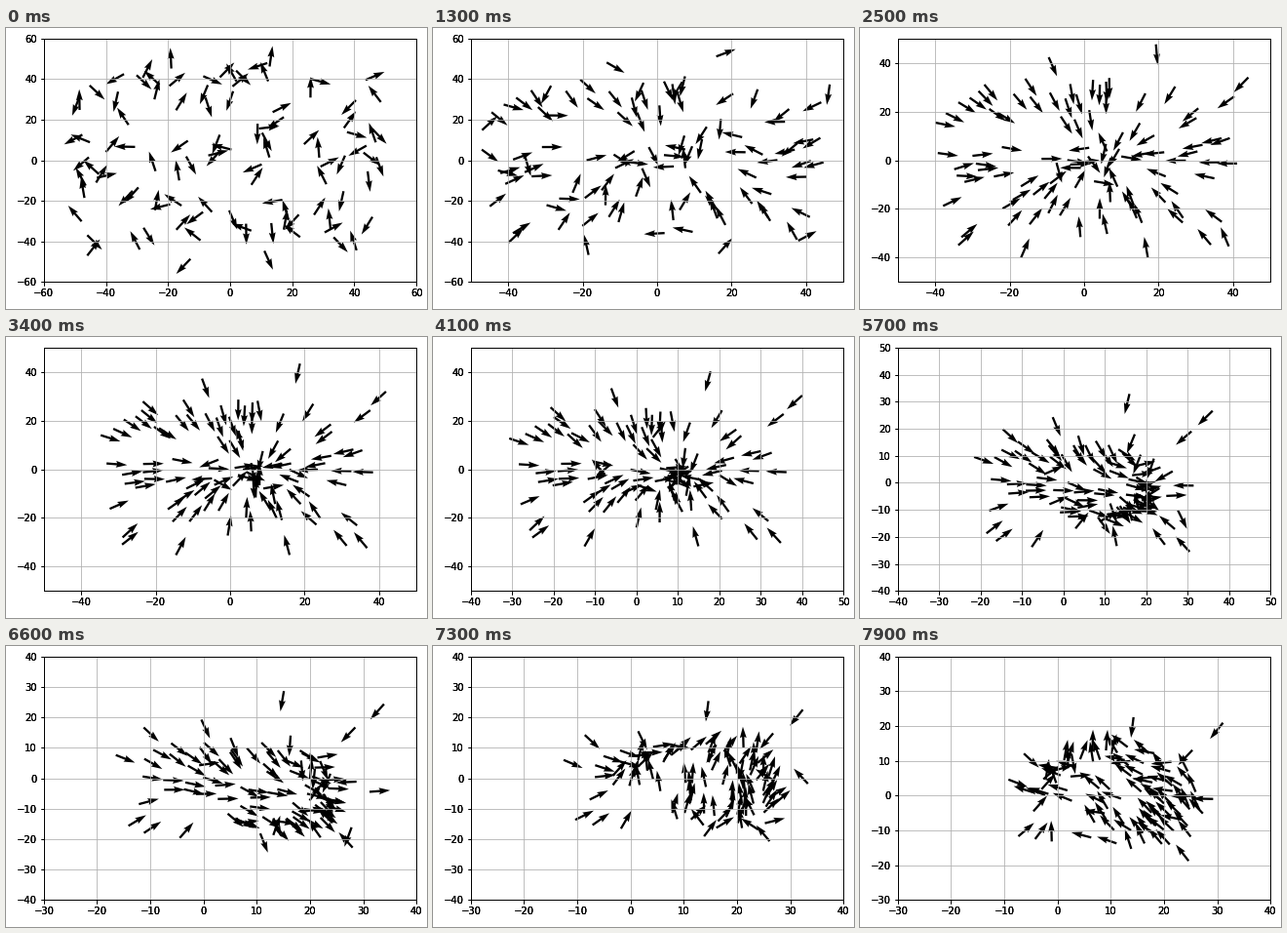
Animation, 432 px wide and 288 px high, one loop 8 s. Source, as a matplotlib script:

```python
import numpy as np
import matplotlib.pyplot as plt
from matplotlib.animation import FuncAnimation

FRAMES, STEP_MS, COUNT = 80, 100, 100


def unit(angle):
    return np.stack([np.cos(angle), np.sin(angle)], axis=-1)


def separation(p, reach=4):
    """Push away from neighbours closer than reach."""
    gap = p[:, None] - p[None]
    dist = np.hypot(gap[..., 0], gap[..., 1])[..., None] + 1e-6
    return (gap / dist * np.clip(1 - dist / reach, 0, 1)).sum(axis=1)


def simulate():
    rng = np.random.default_rng(7)
    p = rng.uniform(-49, 49, (COUNT, 2))
    angle = rng.uniform(-np.pi, np.pi, COUNT)
    # Boids on the right are slower
    speed = (rng.normal(.56, .07, COUNT) - .003 * p[:, 0])[:, None]
    spread = rng.normal(0, .35, COUNT)

    pos, head = [], []
    for t in range(FRAMES):
        pos.append(p)
        head.append(angle)

        # Far boids seek the middle, near ones follow the flock
        middle = np.array([np.interp(t, [0, 48, 66], [3, 7, 11]),
                           np.interp(t, [48, 66], [0, -4])])
        to_mid = middle - p
        dist = np.hypot(*to_mid.T)[:, None] + 1e-6
        near = np.interp(t, [0, 25, 45], [2, 4, 10])
        far = np.clip((dist - near) / 14, 0, 1)
        flow = np.radians(np.interp(t, [30, 66, 71, 79], [-5, -22, 110, 160]))
        join = np.interp(t, [25, 45], [0, 1])
        goal = (far * to_mid / dist + (1 - far) * join * unit(flow + spread)
                + .5 * separation(p))

        rate = np.interp(t, [0, 66, 69], [.17, .17, .38])
        v = (1 - rate) * unit(angle) + rate * goal
        angle = np.arctan2(v[:, 1], v[:, 0])
        p = p + speed * unit(angle)
    return pos, head


def limit(start, *steps):
    """Axis limit that moves 10 towards zero at each of the steps."""
    return lambda t: start - np.sign(start) * 10 * sum(t >= s for s in steps)


left, right = limit(-60, 13, 35, 64), limit(60, 10, 65)
bottom, top = limit(-60, 22, 55, 77), limit(60, 19, 62)

pos, head = simulate()

fig = plt.figure(figsize=(6, 4), dpi=72)
box = [38.87 / 432, 27.75 / 288, 382.24 / 432, 249.45 / 288]
ax = fig.add_axes(box)
ax.grid(True)
arrows = ax.quiver(*pos[0].T, *unit(head[0]).T)

# Stacked frames give the heavy tick labels
for i in range(2):
    fig.add_axes(box, sharex=ax, sharey=ax, label=f"frame{i}").patch.set_visible(False)


def update(t):
    ax.set_xlim(left(t), right(t))
    ax.set_ylim(bottom(t), top(t))
    arrows.set_offsets(pos[t])
    arrows.set_UVC(*unit(head[t]).T)
    return arrows,


anim = FuncAnimation(fig, update, frames=FRAMES, interval=STEP_MS, blit=False)
plt.show()
```
